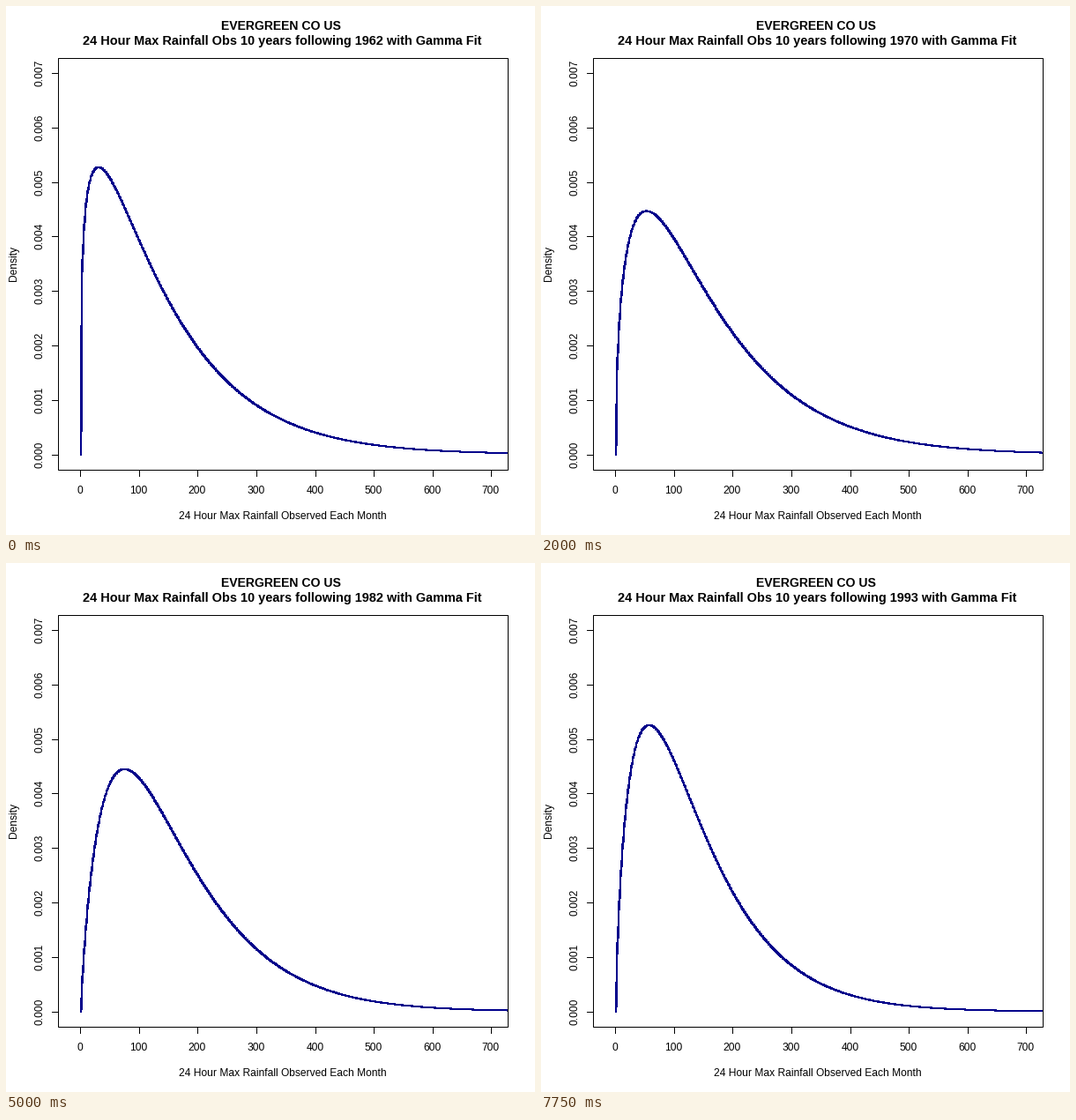
Animation of 600x600 px, one loop 8000 ms. Source, as a matplotlib script:

```python
import math

import numpy as np
import matplotlib.pyplot as plt
from matplotlib.animation import FuncAnimation
from matplotlib.patches import Rectangle

plt.rcParams["font.family"] = "Liberation Sans"

SIZE, DPI = 600, 100
PT = 72 / DPI  # points per pixel
LEFT, TOP, RIGHT, BOTTOM = 59, 59, 569, 526
FIRST_YEAR, YEARS = 1962, 32

# Gamma fits at key years; the years between are interpolated.
KEY_YEARS = [1962, 1968, 1973, 1978, 1982, 1988, 1993]
SHAPES = [1.264, 1.62, 1.247, 1.235, 1.83, 1.428, 1.695]
SCALES = [113.5, 101, 125.3, 126, 89.4, 101.7, 81.3]

fig = plt.figure(figsize=(SIZE / DPI, SIZE / DPI), dpi=DPI, facecolor="white")
ax = fig.add_axes([0, 0, 1, 1])
ax.set(xlim=(0, SIZE), ylim=(SIZE, 0))
ax.axis("off")


def px(rain):
    return 84.62 + 0.666 * rain


def py(density):
    return 509.24 - 61840 * density


def rule(xs, ys):
    ax.plot(xs, ys, color="black", lw=PT, snap=False, solid_capstyle="butt")


def label(x, y, text, size=12, **style):
    return ax.text(x, y, text, fontsize=size * PT, ha="center", va="baseline",
                   rotation_mode="anchor", color="black", **style)


def draw_axes():
    # Half-pixel centres keep one-pixel lines crisp.
    ax.add_patch(Rectangle((LEFT + 0.5, TOP + 0.5), RIGHT - LEFT, BOTTOM - TOP,
                           fill=False, edgecolor="black", lw=PT, snap=False))
    for i in range(8):
        x = math.floor(px(100 * i)) + 0.5
        y = math.floor(py(0.001 * i)) + 0.5
        rule([x, x], [BOTTOM + 1, BOTTOM + 8])
        rule([LEFT - 7, LEFT], [y, y])
        label(x - 1, 553, str(100 * i))
        label(42, y - 1, f"{0.001 * i:.3f}", rotation=90)
    label(314, 582, "24 Hour Max Rainfall Observed Each Month")
    label(12.5, 292, "Density", rotation=90)
    label(312.3, 27, "EVERGREEN CO US", 14, weight="bold")


def gamma_pdf(x, shape, scale):
    return (x / scale) ** (shape - 1) * np.exp(-x / scale) / (
        scale * math.gamma(shape))


draw_axes()
title = label(313.5, 44, "", 14.5, weight="bold")
rain = np.arange(0, 741.0)
curve, = ax.plot([], [], color="#00008b", lw=1.7 * PT, antialiased=False,
                 snap=False, solid_joinstyle="bevel", zorder=5)
curve.set_clip_path(Rectangle((LEFT, TOP), RIGHT - LEFT, BOTTOM - TOP,
                              transform=ax.transData))


def update(frame):
    year = FIRST_YEAR + frame
    shape = np.interp(year, KEY_YEARS, SHAPES)
    scale = np.interp(year, KEY_YEARS, SCALES)
    density = gamma_pdf(rain, shape, scale)
    # Whole-pixel vertices give the crisp stepped line.
    curve.set_data(np.floor(px(rain)) + 1, np.floor(py(density)))
    title.set_text(f"24 Hour Max Rainfall Obs 10 years following {year} "
                   "with Gamma Fit")
    return curve, title


anim = FuncAnimation(fig, update, frames=YEARS, interval=250, repeat=True)
plt.show()
```
